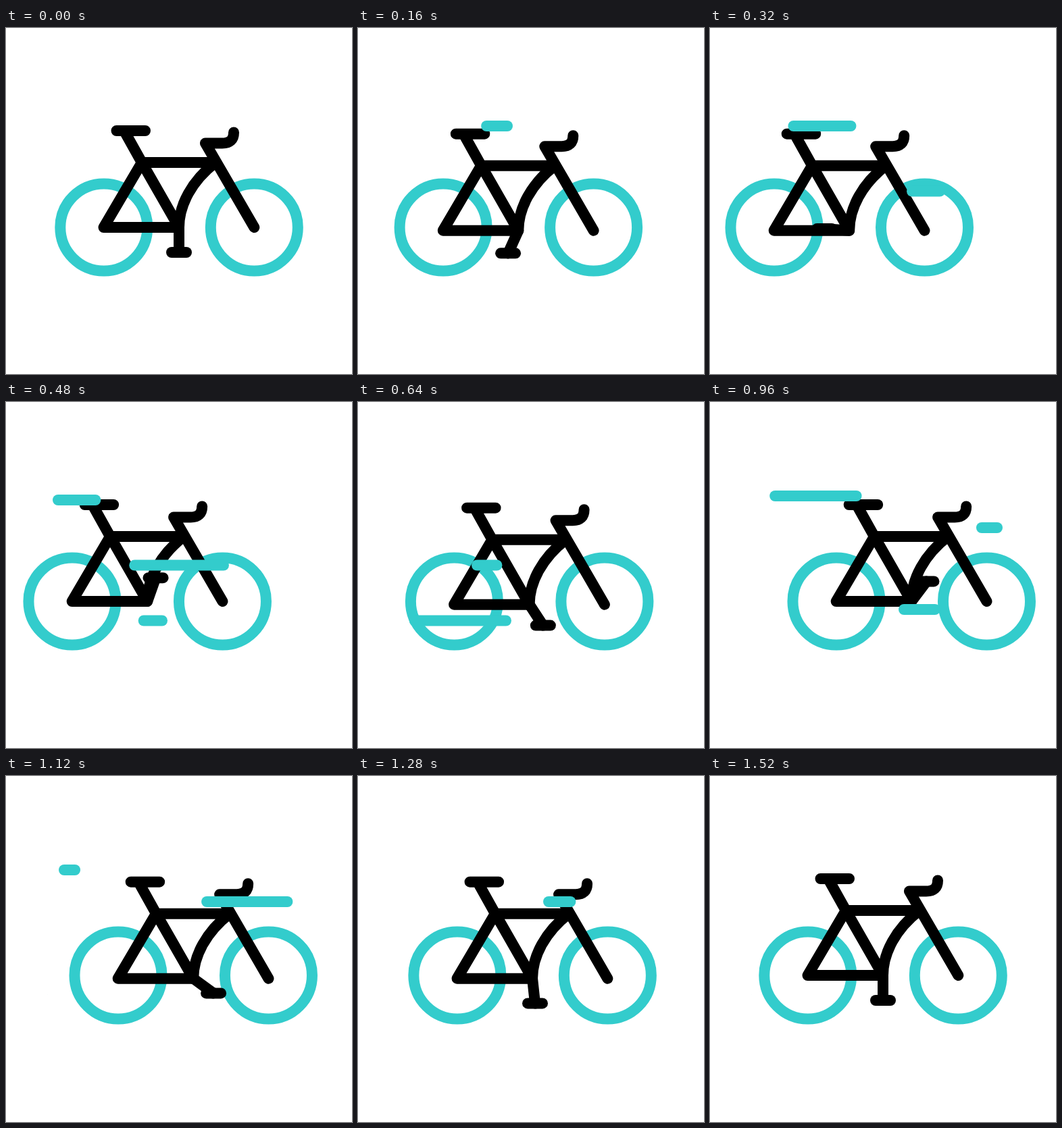
Write an HTML page without scripts that moves like this. It is 512 by 512 pixels and loops after 1600 ms.

```html
<!DOCTYPE html>
<html lang="en">
<head>
<meta charset="utf-8">
<title>Bicycle</title>
<style>
/* --f is a clock of 20 ticks; every pose is computed from it */
@property --f { syntax: "<number>"; inherits: true; initial-value: 0; }
@keyframes tick { to { --f: 20; } }

html, body { margin: 0; width: 100%; height: 100%; overflow: hidden; background: #fff; }

svg {
  display: block;
  width: 100%;
  height: 100%;
  fill: none;
  stroke-width: 16px;
  stroke-linecap: round;
  stroke-linejoin: round;
  animation: tick 1.6s steps(20) infinite;
}

.bike {
  --back: clamp(0, var(--f) / 5.1, 1);
  --ahead: clamp(0, (var(--f) - 4.8) / 6.2, 1);
  --home: clamp(0, (var(--f) - 10.9) / 5.9, 1);
  transform: translateX(calc(
    -28px * (1 - cos(180deg * var(--back)))
    + 51px * (1 - cos(180deg * var(--ahead)))
    - 23px * (1 - cos(180deg * var(--home)))));
}

.wheels { stroke: #33cccc; }

.body {
  stroke: #000;
  transform: translateY(calc(3.1px * (1 - cos(60deg * min(var(--f), 18)))));
}

/* two full turns, eased */
.pedal {
  --turn: calc(360deg * (1 - cos(180deg * min(1, var(--f) / 17))));
}
.crank { transform: rotate(var(--turn)); }
.foot {
  transform: translate(calc(-37px * sin(var(--turn))), calc(37px * cos(var(--turn))));
}

/* a streak runs from --r to --l: head eases over --a..--b, tail over --c..--d */
.streak {
  --hp: clamp(0, (var(--f) - var(--a)) / (var(--b) - var(--a)), 1);
  --tp: clamp(0, (var(--f) - var(--c)) / (var(--d) - var(--c)), 1);
  --span: (var(--r) - var(--l)) / 2;
  --head: (var(--r) - var(--span) * (1 - cos(180deg * var(--hp))));
  --len: (var(--span) * (cos(180deg * var(--tp)) - cos(180deg * var(--hp))));
  --cap: clamp(0, var(--len) - 2, 1);
  x: calc(1px * (var(--head) - 8));
  width: calc(1px * var(--cap) * (var(--len) + 16));
  height: 16px;
  rx: 8px;
  fill: #33cccc;
}
</style>
</head>
<body>
<svg viewBox="0 0 512 512">
  <g class="bike">
    <g class="wheels">
      <circle cx="144.8" cy="295" r="64.5"/>
      <circle cx="367.3" cy="295" r="64.5"/>
    </g>
    <g class="body">
      <path d="M163.5 152H206M177 156L201 199L256 295H144.5L201 199H310C275 226 256 262 256 295"/>
      <path d="M367.3 295L295 170.5H320Q337 170.5 337 154.5"/>
      <g class="pedal" transform="translate(256 295)">
        <path class="crank" d="M0 0V37"/>
        <path class="foot" d="M-11 0H11"/>
      </g>
    </g>
  </g>
  <rect class="streak" y="137" style="--l:74; --r:221; --a:0; --b:6.6; --c:3; --d:8.3"/>
  <rect class="streak" y="233.5" style="--l:176; --r:340; --a:2.6; --b:6.8; --c:5.15; --d:9.1"/>
  <rect class="streak" y="315.5" style="--l:70; --r:231; --a:5; --b:8.7; --c:7.4; --d:10.8"/>
  <rect class="streak" y="131" style="--l:86; --r:246; --a:8.9; --b:12.6; --c:10.9; --d:14.8"/>
  <rect class="streak" y="299" style="--l:287; --r:455; --a:8; --b:11.8; --c:9.4; --d:13.4"/>
  <rect class="streak" y="178" style="--l:282; --r:425; --a:11; --b:14.8; --c:13.4; --d:17.2"/>
</svg>
</body>
</html>
```
